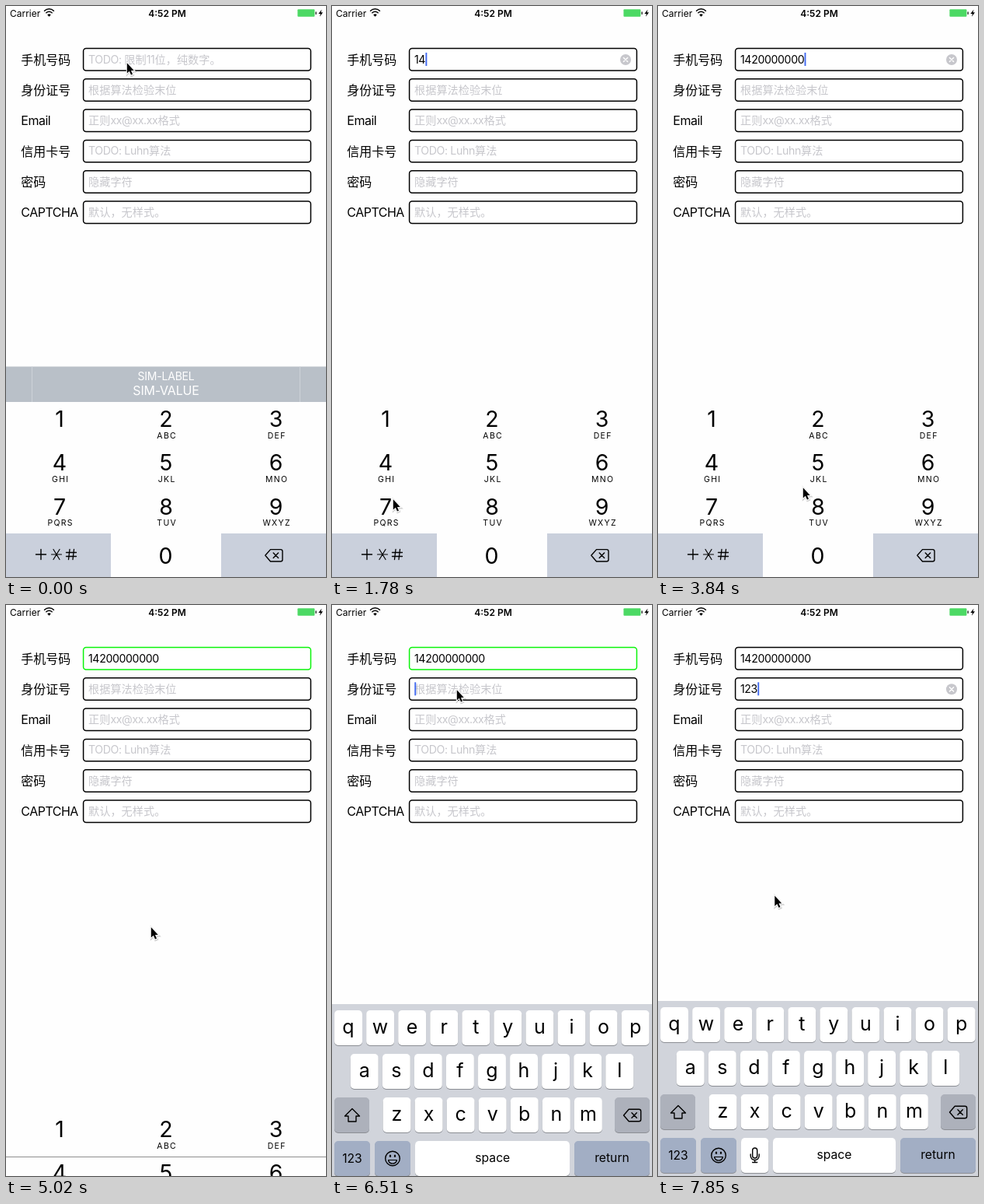
An HTML page that plays this animation: 412x734 px, repeating every 8 s.

```html
<!DOCTYPE html>
<html lang="zh">
<head>
<meta charset="utf-8">
<title>Form input</title>
<style>
html, body { margin: 0; width: 100%; height: 100%; overflow: hidden; background: #fefefe; }
svg { display: block; width: 100%; height: 100%; }
text { font-family: Inter, "Noto Sans CJK SC", "Noto Sans CJK", sans-serif; white-space: pre; }
.label { font-size: 16px; }
.field { font-size: 14.2px; }
.hint { fill: #c7c7cc; }
.label .latin { letter-spacing: -.5px; }
.field .latin { letter-spacing: -.4px; }
.mid { text-anchor: middle; }
.digit { font-size: 28.5px; }
.abc { font-size: 10.5px; letter-spacing: 1.3px; }
.letter { font-size: 25px; }
.word { font-size: 15.7px; }
.line { fill: none; stroke: #000; stroke-width: 1.4; stroke-linecap: round; stroke-linejoin: round; }
</style>
</head>
<body>
<svg id="stage" viewBox="0 0 412 734" xmlns="http://www.w3.org/2000/svg"></svg>
<script>
const LOOP = 8000, STEP = LOOP / 54;
const PHONE = '14200000000', IDNO = '123';
// Ticks at which each character appears
const PHONE_KEYS = [8, 11, 14, 17, 19, 22, 23, 24, 25, 26, 28];
const IDNO_KEYS = [52, 52, 53];
const LABELS = ['手机号码', '身份证号', 'Email', '信用卡号', '密码', 'CAPTCHA'];
const HINTS = ['TODO: 限制11位，纯数字。', '根据算法检验末位', '正则xx@xx.xx格式',
  'TODO: Luhn算法', '隐藏字符', '默认，无样式。'];
const PITCH = 39.31, PAD_PITCH = 56.23;
const COLS = [[0, 135, 69], [135, 142, 206], [277, 135, 347.5]];

// Pointer path: tick, x, y
const PATH = [
  [0, 155, 72], [1, 150, 150], [2, 130, 360], [3, 100, 560], [4, 85, 644], [5, 76, 570],
  [6, 71, 531], [8, 71, 531], [10, 71, 586], [11, 72, 592], [12, 78, 633], [14, 78, 633],
  [15, 185, 637], [21, 185, 637], [23, 186, 618], [27, 186, 618], [29, 226, 661],
  [30, 210, 658], [31, 178, 640], [32, 186, 610], [33, 186, 610], [34, 186, 413],
  [35, 183, 330], [36, 175, 220], [37, 165, 130], [38, 160, 108], [45, 160, 108],
  [48, 156, 250], [51, 149.5, 372.5]
];

const wrap = s => s.replace(/[\x20-\x7e]+/g, '<tspan class="latin">$&</tspan>');
const text = (x, y, cls, s, more = '') => `<text x="${x}" y="${y}" class="${cls}" ${more}>${s}</text>`;
const rect = (x, y, w, h, fill, more = '') =>
  `<rect x="${x}" y="${y}" width="${w}" height="${h}" fill="${fill}" ${more}/>`;
const path = (d, x = 0, y = 0, more = '') =>
  `<path class="line" d="${d}" transform="translate(${x} ${y})" ${more}/>`;

const BACKSPACE = 'M-4.5 -7.7H8.5Q11 -7.7 11 -5.2V5.2Q11 7.7 8.5 7.7H-4.5L-11.2 0ZM-.8 -3.2L5.6 3.2M5.6 -3.2L-.8 3.2';

function statusBar() {
  return text(5, 14, '', 'Carrier', 'font-size="12"') +
    path('M-6 -2.8A8.5 8.5 0 0 1 6 -2.8M-3.7 -.2A5.2 5.2 0 0 1 3.7 -.2', 55.5, 9, 'stroke-width="1.7"') +
    '<path d="M55.5 13.8L53.2 11.3A3.3 3.3 0 0 1 57.8 11.3Z"/>' +
    text(207.5, 14, 'mid', '4:52 PM', 'font-size="12" font-weight="600"') +
    rect(375.4, 4.3, 22, 9.4, '#4cd964', 'rx="1"') +
    rect(398.4, 7.3, 1.4, 3.6, '#222', 'rx=".7"') +
    '<path d="M406.5 4.5L402.3 9.9H404.9L403.9 13.8L408 8.3H405.5Z"/>';
}

function form() {
  return LABELS.map((s, i) => {
    const y = i * PITCH;
    return text(19.3, 74.7 + y, 'label', wrap(s)) +
      rect(99.6, 54.5 + y, 292.8, 28.4, '#fff', `id="box${i}" rx="3.5" stroke="#000" stroke-width="1.5"`) +
      text(106, 73.5 + y, 'field hint', wrap(HINTS[i]), `id="hint${i}"`);
  }).join('') + [0, 1].map(i => text(106, 73.5 + i * PITCH, 'field', '<tspan class="latin"></tspan>', `id="val${i}"`)).join('') +
    '<g id="clear"><circle cx="378" cy="69" r="7" fill="#c7c7cc"/>' +
    path('M-2.6 -2.6L2.6 2.6M2.6 -2.6L-2.6 2.6', 378, 69, 'style="stroke:#fff"') + '</g>' +
    rect(106.3, 60, 1.9, 17, '#4069f0', 'id="caret"');
}

function simBar() {
  return '<g id="sim">' + rect(0, 463.5, 412, 46, '#b9c0c8') +
    rect(33, 463.5, 1, 46, '#cdd2d8') + rect(378, 463.5, 1, 46, '#cdd2d8') +
    text(206, 481, 'mid', 'SIM-LABEL', 'fill="#fff" font-size="14" letter-spacing="-.2"') +
    text(206, 500, 'mid', 'SIM-VALUE', 'fill="#fff" font-size="16" letter-spacing="-.2"') + '</g>';
}

function keypad() {
  const abc = ['', 'ABC', 'DEF', 'GHI', 'JKL', 'MNO', 'PQRS', 'TUV', 'WXYZ'];
  let s = rect(0, 509, 412, 225, '#fefefe') + rect(0, 0, 0, PAD_PITCH, '#ccd1dc', 'id="press"');
  abc.forEach((a, i) => {
    const x = COLS[i % 3][2], y = Math.floor(i / 3) * PAD_PITCH;
    s += text(x, 541.1 + y, 'mid digit', i + 1) + text(x + 1.2, 556 + y, 'mid abc', a);
  });
  return '<g id="pad">' + s + rect(0, 678, 135, 56, '#cad0dc') + rect(277, 678, 135, 56, '#cad0dc') +
    path('M-6.5 0H6.5M0 -6.5V6.5', 45, 705) +
    path('M-6.5 0H6.5M-4 -6.5L4 6.5M4 -6.5L-4 6.5', 65, 705, 'style="stroke-width:1.2"') +
    path('M-6.5 -2.5H6.5M-6.5 2.5H6.5M-2 -6.5L-3.5 6.5M3.5 -6.5L2 6.5', 84, 705, 'style="stroke-width:1.3"') +
    text(205.5, 716.5, 'mid digit', '0') + path(BACKSPACE, 345, 706.3) +
    rect(0, 566, 412, 1, '#8e8e8e', 'id="rule"') + '</g>';
}

function keyboard() {
  const key = (x, y, w, fill = '#fff') =>
    rect(x, y + 1, w, 45, '#8b8e94', 'rx="5"') + rect(x, y, w, 45, fill, 'rx="5"');
  const GRAY = '#adb1bb', BLUE = '#a2aec4';
  let s = rect(0, 509, 412, 230, '#d1d4db');
  [['qwertyuiop', 3.1], ['asdfghjkl', 23.8], ['zxcvbnm', 65.6]].forEach(([row, x0], r) => {
    [...row].forEach((c, i) => {
      const x = x0 + i * 41.06, y = 517 + r * 56;
      s += key(x, y, 35.9) + text(x + 17.9, y + 29.5, 'mid letter', c);
    });
  });
  s += key(3, 629, 45, GRAY) + path('M0 -8.5L9.5 1H5V8H-5V1H-9.5Z', 26, 652) +
    key(364, 629, 45, GRAY) + path(BACKSPACE, 386.7, 652) +
    key(3, 685, 46, BLUE) + text(26, 712.5, 'mid word', '123') +
    key(55, 685, 46, BLUE) + '<circle class="line" cx="78" cy="707.5" r="9.3"/>' +
    path('M-5.5 2H5.5Q4.5 6.6 0 6.6T-5.5 2Z', 78, 707.5, 'style="stroke-width:1.2"') +
    '<ellipse cx="75" cy="704.3" rx="1.1" ry="1.8"/><ellipse cx="81" cy="704.3" rx="1.1" ry="1.8"/>' +
    '<g id="wide">' + key(107, 685, 199) + text(206.8, 711.5, 'mid word', 'space') + '</g>' +
    '<g id="mic">' + key(107, 685, 35.3) + key(148, 685, 158) + text(227, 711.5, 'mid word', 'space') +
    path('M-3 -6A3 3 0 0 1 3 -6V1A3 3 0 0 1 -3 1ZM-5.5 -1V1A5.5 5.5 0 0 0 5.5 1V-1M0 6.5V9.5M-3 9.5H3', 124.7, 707) + '</g>' +
    key(312, 685, 97, BLUE) + text(360.5, 711.5, 'mid word', 'return');
  return '<g id="keys">' + s + '</g>';
}

function pointer() {
  const d = 'M.8 1.3V14.4L3.8 11.7L6 16.6L8 15.7L6 11H9.8Z';
  return `<g id="pointer"><path d="${d}" transform="translate(.5 1)" fill="none" stroke="#000" stroke-opacity=".18" stroke-width="3"/>` +
    `<path d="${d}" stroke="#fff" stroke-width="2" paint-order="stroke"/></g>`;
}

const stage = document.getElementById('stage');
stage.innerHTML = rect(0, 0, 412, 734, '#fefefe') + statusBar() + form() + simBar() + keypad() + keyboard() + pointer();

const el = {};
stage.querySelectorAll('[id]').forEach(n => el[n.id] = n);
const show = (n, on) => n.setAttribute('display', on ? 'inline' : 'none');
const move = (n, x, y) => n.setAttribute('transform', `translate(${x} ${y})`);
const typed = (s, keys, k) => s.slice(0, keys.filter(t => t <= k).length);
const between = (k, a, b) => k >= a && k <= b;

function pointerAt(k) {
  const i = PATH.findIndex(p => p[0] > k);
  if (i < 0) return PATH[PATH.length - 1].slice(1);
  const [a, x, y] = PATH[i - 1], [b, u, v] = PATH[i], f = (k - a) / (b - a);
  return [x + (u - x) * f, y + (v - y) * f];
}

function pressKey(n) {
  show(el.press, n);
  if (!n) return;
  const [x, w] = COLS[(n - 1) % 3];
  el.press.setAttribute('x', x);
  el.press.setAttribute('width', w);
  el.press.setAttribute('y', 509 + Math.floor((n - 1) / 3) * PAD_PITCH);
}

function draw(ms) {
  const k = Math.min(53, Math.floor((ms + 24) / STEP));
  const vals = [typed(PHONE, PHONE_KEYS, k), typed(IDNO, IDNO_KEYS, k)];
  vals.forEach((s, i) => {
    el['val' + i].firstChild.textContent = s;
    show(el['hint' + i], !s);
  });
  el.box0.setAttribute('stroke', between(k, 34, 44) ? '#0bf30b' : '#000');

  const row = k < 34 ? 0 : k >= 44 ? 1 : -1;
  const blink = k < 2 || between(k, 5, 6) || between(k, 30, 31) || between(k, 47, 49);
  show(el.caret, row >= 0 && !blink);
  show(el.clear, row >= 0 && vals[row]);
  if (row >= 0) {
    const w = vals[row] ? el['val' + row].getComputedTextLength() : 0;
    move(el.caret, w, row * PITCH);
    move(el.clear, 0, row * PITCH);
  }

  show(el.sim, k < 10);
  move(el.sim, 0, k === 9 ? 23 : 0);
  const drop = k < 34 ? 0 : k === 34 ? 143 : k === 35 ? 203 : 240;
  show(el.pad, drop < 240);
  show(el.rule, drop);
  move(el.pad, 0, drop);
  pressKey(k === 7 ? 1 : k === 10 ? 4 : k === 17 || k === 19 ? 8 : 0);

  show(el.keys, k >= 44);
  move(el.keys, 0, k === 44 ? 4 : 0);
  show(el.mic, k > 44);
  show(el.wide, k <= 44);
  move(el.pointer, ...pointerAt(k));
}

function frame() {
  draw(performance.now() % LOOP);
  requestAnimationFrame(frame);
}
frame();
</script>
</body>
</html>
```
